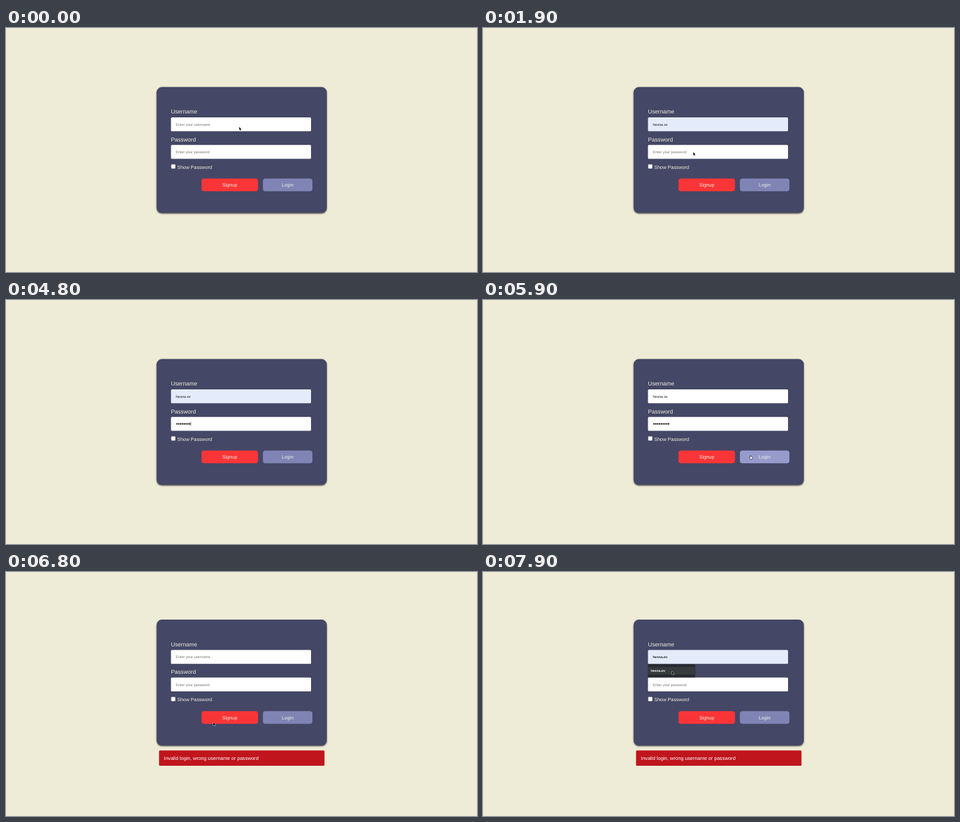
An HTML page that plays this animation: 718 by 374 pixels, repeating every 8000 ms.

```html
<!DOCTYPE html>
<html lang="en">
<head>
<meta charset="utf-8">
<title>Login form</title>
<style>
html, body { margin: 0; width: 100%; height: 100%; overflow: hidden; background: #eeecd6; }
svg { display: block; width: 718px; height: 374px; font-family: "Liberation Sans", Arial, sans-serif; text-rendering: geometricPrecision; }
.card { filter: drop-shadow(0 1.6px .9px rgba(45, 35, 35, .8)); }
</style>
</head>
<body>
<svg id="stage" viewBox="0 0 718 374"></svg>
<script>
const LOOP = 8000, STEP = 100, USER = 'hesna.ov';
const CREAM = '#f0eee0', GREY = '#757575', INK = '#1c1c1c';
const stage = document.getElementById('stage');

// Pointer moves: start, end, x, y
const moves = [
  [100, 400, 289, 147],   // to the username field
  [700, 900, 286, 167],   // to the suggestion
  [1500, 1800, 360, 198],
  [1800, 2300, 279, 182], // to the password field
  [5300, 5700, 407, 238], // to the login button
  [6100, 6800, 316, 230.5],
  [6800, 7300, 289, 128], // back to the username field
  [7500, 7900, 288, 152]
];

const within = (t, a, b) => t >= a && t < b;

const rect = (x, y, w, h, fill, r = 0, extra = '') =>
  `<rect x="${x}" y="${y}" width="${w}" height="${h}" rx="${r}" fill="${fill}" ${extra}/>`;

const text = (x, y, size, fill, str, extra = '') =>
  `<text x="${x}" y="${y}" font-size="${size}" fill="${fill}" ${extra}>${str}</text>`;

const field = (y, fill) => rect(251.5, y, 213.5, 21.3, fill, 1.5);

const button = (x, w, fill, label) =>
  rect(x, 230.8, w, 19.5, fill, 4) +
  text(x + w / 2, 243.2, 7.35, CREAM, label, 'text-anchor="middle"');

function pointer(t, hand) {
  if (within(t, 2900, 5300)) return '';
  let x = 355.5, y = 151.5;
  for (const [from, to, nx, ny] of moves) {
    const k = 1 - (1 - Math.min(1, Math.max(0, (t - from) / (to - from)))) ** 3;
    x += (nx - x) * k;
    y += (ny - y) * k;
  }
  const shape = hand
    ? '<path d="M0 .3Q.8-.3 1.1.6L1.5 2 3.6 2.6Q4.3 3 4 4.2L3.4 6H.9L-1 3.6Q-.9 2.8.2 3.2Z" fill="#fff" stroke="#222" stroke-width=".7"/>'
    : '<path d="M0 0V5L1.1 4 1.9 5.8 2.8 5.4 2 3.7H3.5Z" fill="#111" stroke="#fff" stroke-width=".7" paint-order="stroke"/>';
  return `<g transform="translate(${x} ${y})">${shape}</g>`;
}

function username(t, preview) {
  const blue = preview || within(t, 1500, 5800);
  let label = text(259, 149.7, 5.62, GREY, 'Enter your username');
  if (preview) label = text(259, 149.7, 5.1, INK, USER, 'font-weight="bold"');
  else if (within(t, 1500, 6100)) label = text(259, 149.7, 5.55, INK, USER);
  return field(137, blue ? '#e4ecfb' : '#fff') + label;
}

function password(t) {
  const typed = t < 6100 ? Math.min(9, Math.max(0, Math.floor((t - 3200) / 225) + 1)) : 0;
  let out = field(179.2, '#fff');
  if (!typed) out += text(259, 192, 5.62, GREY, 'Enter your password');
  for (let i = 0; i < typed; i++)
    out += `<circle cx="${260.6 + 2.8 * i}" cy="189.9" r="1.15" fill="#111"/>`;
  if (within(t, 2300, 5800)) out += rect(259 + 2.83 * typed, 186.3, .5, 6.6, INK);
  return out;
}

function dropdown(preview) {
  return rect(251.5, 159, 72, 20, '#282a30', 1) +
    rect(252, 163, 71, 11.5, preview ? '#373b3d' : '#2e3135') +
    text(256, 170.3, 5, '#fff', USER, 'font-weight="bold"');
}

function draw(t) {
  const failed = t >= 6100;
  const preview = within(t, 800, 1500) || t >= 7700;
  const menu = within(t, 500, 1500) || t >= 7500;
  const hover = within(t, 5700, 6100);

  stage.innerHTML =
    `<g transform="translate(0 ${failed ? -17.5 : 0})">` +
    rect(229.7, 90.6, 259.3, 192.9, '#444765', 8, 'class="card"') +
    text(251.4, 131.2, 8.7, CREAM, 'Username') +
    username(t, preview) +
    text(251.4, 173.5, 8.7, CREAM, 'Password') +
    password(t) +
    rect(251.8, 209.1, 6.4, 6.4, '#fff', 1, 'stroke="#858585" stroke-width=".4"') +
    text(261, 215.8, 7.42, CREAM, 'Show Password') +
    button(298, 86.2, '#fa3537', 'Signup') +
    button(391.6, 75.5, hover ? '#979bcc' : '#8084b5', 'Login') +
    (menu ? dropdown(preview) : '') +
    '</g>' +
    (failed ? rect(233.3, 273.5, 252.2, 23.5, '#c0151d', 1.5) +
      text(240.8, 287.5, 7.58, '#fff', 'Invalid login, wrong username or password') : '') +
    pointer(t, hover);
}

const start = performance.now();
let shown = -1;
function tick() {
  const step = Math.floor((performance.now() - start) % LOOP / STEP);
  if (step !== shown) draw((shown = step) * STEP);
  requestAnimationFrame(tick);
}
tick();
</script>
</body>
</html>
```
